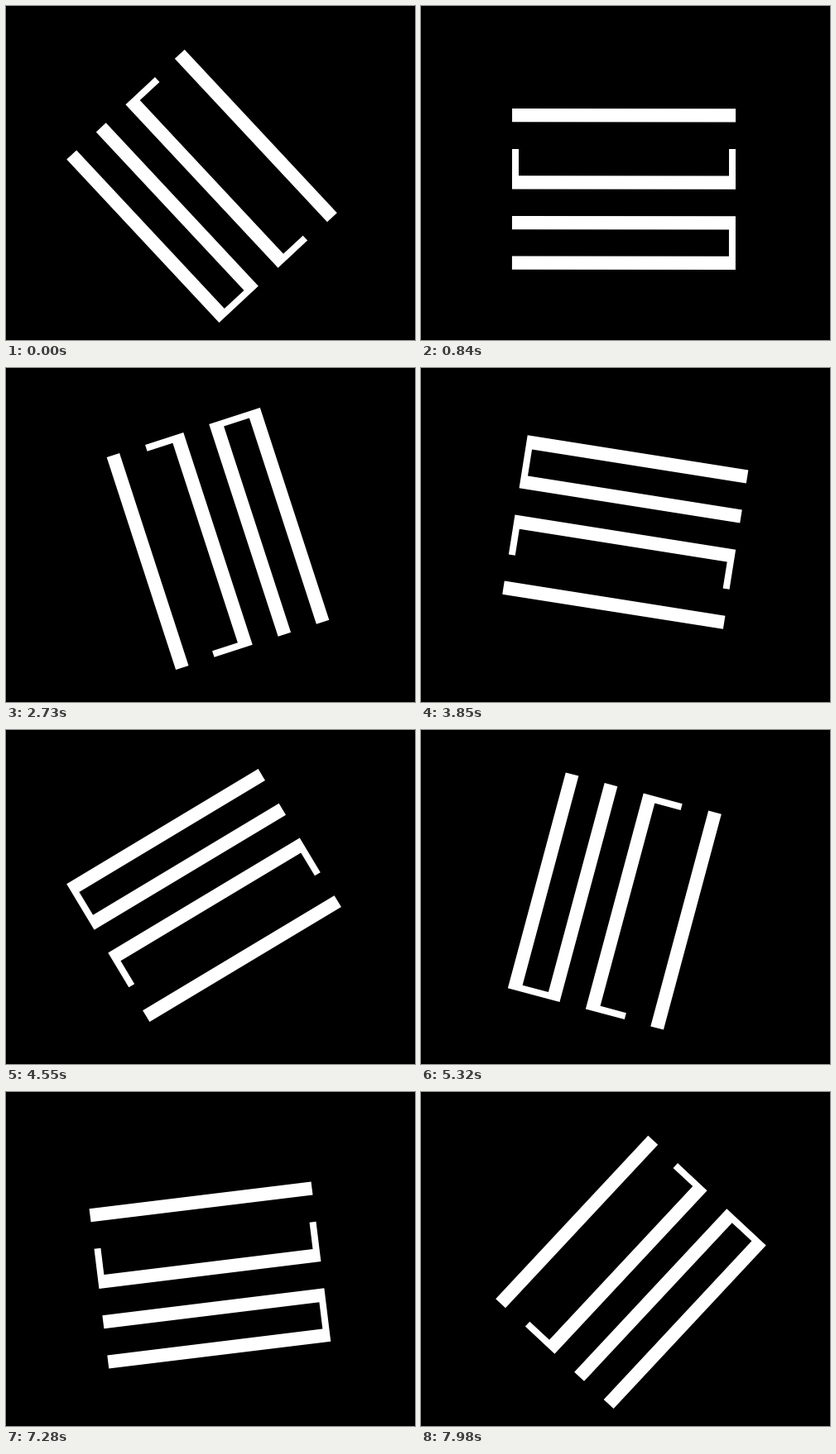
An HTML page for the animation above (8000 ms loop, 494 px wide and 404 px high).

```html
<!DOCTYPE html>
<html lang="en">
<head>
<meta charset="utf-8">
<title>Rotating bars</title>
<style>
  html, body { margin: 0; width: 100%; height: 100%; overflow: hidden; background: #000; }
  svg { display: block; width: 100vw; height: 100vh; }
</style>
</head>
<body>
<svg viewBox="0 0 494 404">
  <g id="bars" fill="#fff">
    <path d="M-108.9 -135h16.2v262h32.4v-262h16.2v270h-64.8z"/>
    <path d="M-11.6 -135h48.6v8h-32.4v254h32.4v8h-48.6z"/>
    <path d="M69.6 -135h16.2v270h-16.2z"/>
  </g>
</svg>
<script>
  const LOOP = 8000, STEP = 70;
  // [step, degrees]: a nearly steady counter-clockwise turn
  const KEYS = [[0, -43], [23, -133], [39, -198], [55, -261], [76, -345], [94, -417], [114, -497]];
  const bars = document.getElementById('bars');

  function angleAt(step) {
    const i = Math.max(1, KEYS.findIndex(([s]) => s >= step));
    const [s0, a0] = KEYS[i - 1], [s1, a1] = KEYS[i];
    return a0 + (a1 - a0) * (step - s0) / (s1 - s0);
  }

  function draw() {
    const step = Math.floor(performance.now() % LOOP / STEP);
    bars.setAttribute('transform', `translate(245 210) rotate(${angleAt(step)})`);
    requestAnimationFrame(draw);
  }
  draw();
</script>
</body>
</html>
```
